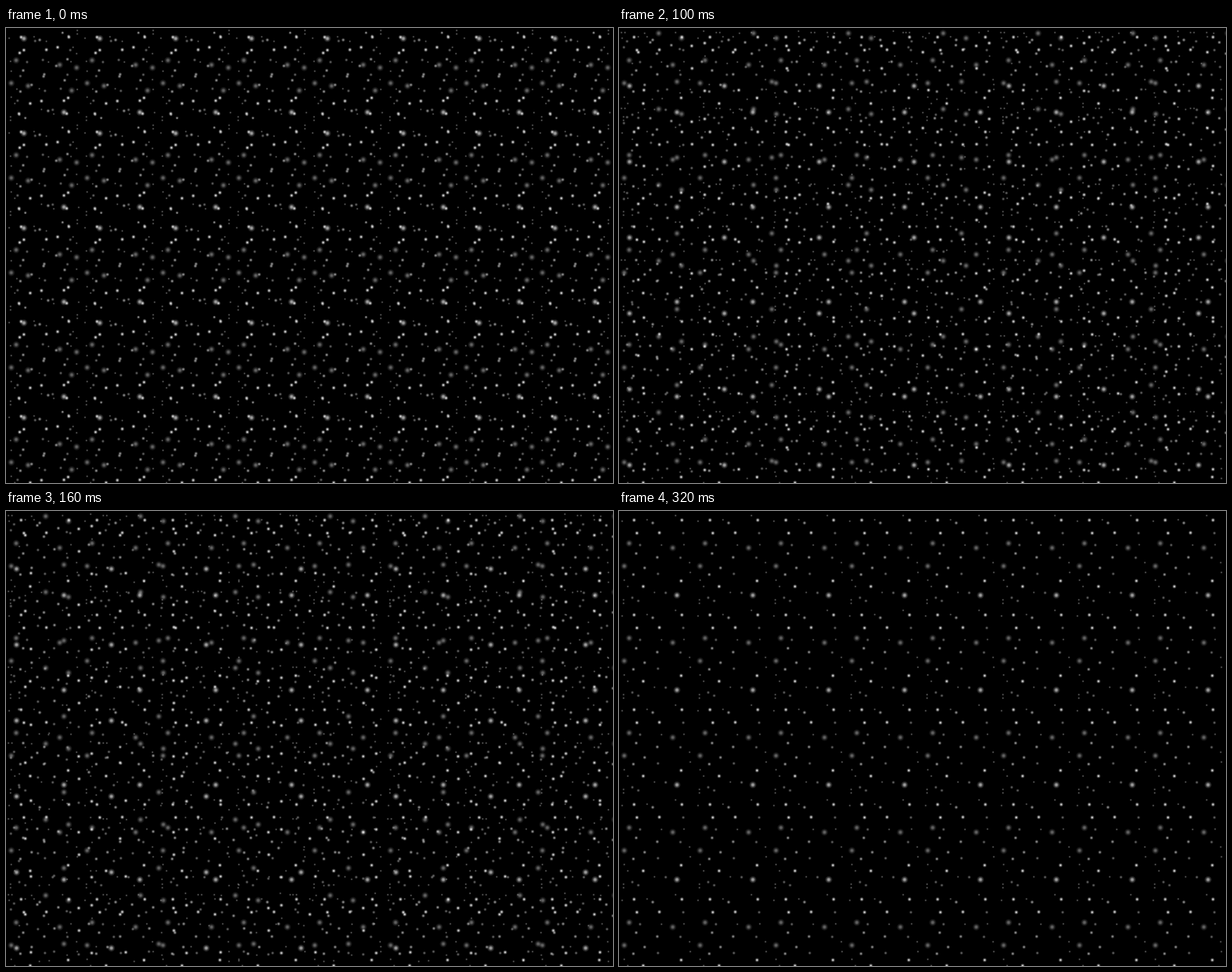
Recreate the animation shown at these times as an HTML page without scripts. Size 864x648 px, loop 400 ms.

```html
<!DOCTYPE html>
<html lang="en">
<head>
<meta charset="utf-8">
<title>Twinkling stars</title>
<style>
  html, body { margin: 0; width: 100%; height: 100%; overflow: hidden; background: #000; }
  svg { display: block; width: 864px; height: 648px; }
  .flip, .turn { opacity: 0; animation: 400ms step-end infinite; }
  .flip { animation-name: flip; }
  .turn { animation-name: turn; }
  @keyframes flip { 0% { opacity: 1; } 25%, 100% { opacity: 0; } }
  @keyframes turn { 0% { opacity: 0; } 25% { opacity: 1; } 50%, 100% { opacity: 0; } }
</style>
</head>
<body>
<svg viewBox="0 0 864 648">
  <defs>
    <radialGradient id="glow">
      <stop offset="0" stop-color="#fff"/>
      <stop offset=".3" stop-color="#fff" stop-opacity=".78"/>
      <stop offset=".6" stop-color="#fff" stop-opacity=".3"/>
      <stop offset="1" stop-color="#fff" stop-opacity="0"/>
    </radialGradient>
    <circle id="sun" r="5.6" opacity=".68"/>
    <circle id="haze" r="5.6" opacity=".42"/>
    <circle id="star" r="3.4" opacity=".85"/>
    <circle id="mid" r="3.1" opacity=".6"/>
    <circle id="dim" r="2.8" opacity=".42"/>
    <circle id="dot" r="2" opacity=".38"/>

    <!-- one 108 x 135 patch of sky -->
    <g id="sky" fill="url(#glow)" transform="translate(.5 .5)">
      <use href="#sun" x="82" y="119.5"/>
      <use href="#haze" x="14" y="45.5"/>
      <use href="#haze" x="76" y="52"/>
      <use href="#haze" x="7" y="78"/>

      <use href="#star" x="25" y="31"/>
      <use href="#star" x="57" y="30.5"/>
      <use href="#star" x="89" y="12.5"/>
      <use href="#star" x="88" y="99"/>
      <use href="#star" x="34" y="107"/>
      <use href="#star" x="21" y="12.5"/>

      <use href="#mid" x="24" y="60"/>
      <use href="#mid" x="36" y="80.5"/>
      <use href="#mid" x="47.5" y="16.5"/>
      <use href="#mid" x="54" y="65.5"/>
      <use href="#mid" x="20" y="90"/>

      <use href="#dim" x="91" y="31"/>
      <use href="#dim" x="87" y="66"/>
      <use href="#dim" x="55" y="89"/>
      <use href="#dim" x="66" y="116"/>
      <use href="#dim" x="18.5" y="123"/>
      <use href="#dim" x="27" y="127.5"/>
      <use href="#dim" x="29.5" y="48"/>

      <use href="#dot" x="101" y="87"/>
      <use href="#dot" x="39.5" y="12"/>
      <use href="#dot" x="4" y="14"/>
      <use href="#dot" x="60" y="48"/>
      <use href="#dot" x="92" y="47.5"/>
      <use href="#dot" x="12" y="107"/>
      <use href="#dot" x="7" y="98"/>
      <use href="#dot" x="6" y="131"/>
      <use href="#dot" x="6" y="126"/>
      <use href="#dot" x="100" y="73"/>
      <use href="#dot" x="50" y="115.5"/>
      <use href="#dot" x="80" y="6"/>
    </g>

    <pattern id="base" width="108" height="135" patternUnits="userSpaceOnUse">
      <use href="#sky"/>
    </pattern>
    <pattern id="half" width="108" height="135" patternUnits="userSpaceOnUse">
      <use href="#sky" transform="rotate(180 54 67.5)"/>
    </pattern>
    <pattern id="quarter" width="135" height="108" patternUnits="userSpaceOnUse">
      <use href="#sky" transform="translate(135 0) rotate(90)"/>
    </pattern>
  </defs>

  <rect width="864" height="648"/>
  <rect width="864" height="648" fill="url(#base)"/>
  <rect class="flip" width="864" height="648" fill="url(#half)"/>
  <rect class="turn" width="864" height="648" fill="url(#quarter)"/>
</svg>
</body>
</html>
```
